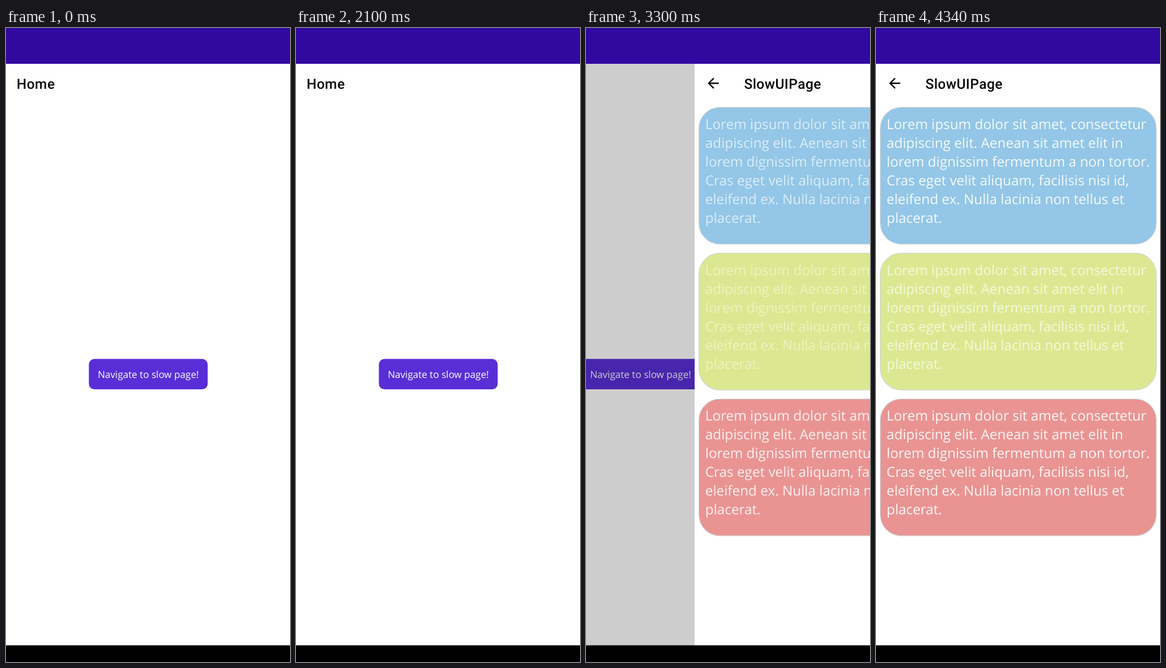
An HTML page with a canvas for the animation above (4.47 s loop, 502x1116 px).

```html
<!DOCTYPE html>
<html lang="en">
<head>
<meta charset="utf-8">
<title>Slow page navigation</title>
<style>
  html, body { margin: 0; width: 100%; height: 100%; overflow: hidden; background: #fff; }
  canvas { display: block; }
</style>
</head>
<body>
<canvas id="stage" width="502" height="1116"></canvas>
<script>
const ctx = document.getElementById('stage').getContext('2d');
const W = 502, H = 1116, TOP = 63, BOTTOM = 1086.6;
const DP = 1.2214;
const LOOP = 4470, STEP = 100;
const SLIDE_START = 3155.7, SLIDE_TIME = 359, SHARPEN = 4200;

const LINES = [
  'Lorem ipsum dolor sit amet, consectetur',
  'adipiscing elit. Aenean sit amet elit in',
  'lorem dignissim fermentum a non tortor.',
  'Cras eget velit aliquam, facilisis nisi id,',
  'eleifend ex. Nulla lacinia non tellus et',
  'placerat.'
];
// Text opacity: while sliding, at rest, after sharpening
const CARDS = [
  { color: '#93c6e7', ink: [0.68, 0.8, 0.9] },
  { color: '#dce891', ink: [0.45, 0.52, 0.68] },
  { color: '#e99493', ink: [0.85, 0.88, 0.9] }
];
const BACK_ARROW = new Path2D('M20,11H7.83l5.59,-5.59L12,4l-8,8 8,8 1.41,-1.41L7.83,13H20z');

// Standard material curve: cubic-bezier(0.4, 0, 0.2, 1)
function ease(x) {
  if (x <= 0) return 0;
  if (x >= 1) return 1;
  const curve = (u, a, b) => 3 * (1 - u) ** 2 * u * a + 3 * (1 - u) * u * u * b + u ** 3;
  let low = 0, high = 1;
  for (let i = 0; i < 30; i++) {
    const mid = (low + high) / 2;
    if (curve(mid, 0.4, 0.2) < x) low = mid; else high = mid;
  }
  return curve(low, 0, 1);
}

function rect(color, x, y, w, h) {
  ctx.fillStyle = color;
  ctx.fillRect(x, y, w, h);
}

function roundRect(color, x, y, w, h, r) {
  ctx.beginPath();
  ctx.roundRect(x, y, w, h, r);
  ctx.fillStyle = color;
  ctx.fill();
}

function text(str, x, y, font, color, { align = 'left', spacing = '0px' } = {}) {
  ctx.font = font;
  ctx.textAlign = align;
  ctx.letterSpacing = spacing;
  ctx.fillStyle = color;
  ctx.fillText(str, x, y);
}

function title(str, x) {
  text(str, x, 107, '500 24.6px Roboto, sans-serif', '#080808', { spacing: '0.4px' });
}

function drawHome() {
  rect('#fff', 0, TOP, W * 2, H - TOP);
  title('Home', 18.8);
  roundRect('#592ed7', 146.5, 582.6, 210, 53.4, 9.8);
  text('Navigate to slow page!', 251.5, 616, '17.1px "Open Sans", sans-serif', '#fff', { align: 'center' });
}

function drawCard(card, index, phase) {
  const y = 139.6 + index * 256.7;
  roundRect(card.color, 7.6, y, 487.8, 240.8, 37);
  ctx.strokeStyle = '#cfd3d4';
  ctx.lineWidth = 1.2;
  ctx.stroke();
  const ink = `rgba(255,255,255,${card.ink[phase]})`;
  LINES.forEach((line, i) =>
    text(line, 18.8, y + 38.3 + i * 33, '24.3px "Open Sans", sans-serif', ink));
}

function drawSlowPage(phase) {
  rect('#fff', 0, TOP, W, H - TOP);
  ctx.save();
  ctx.translate(18.3, 82.6);
  ctx.scale(DP, DP);
  ctx.fillStyle = '#080808';
  ctx.fill(BACK_ARROW);
  ctx.restore();
  title('SlowUIPage', 87.4);
  CARDS.forEach((card, i) => drawCard(card, i, phase));
}

function shifted(x, draw) {
  ctx.save();
  ctx.translate(x, 0);
  draw();
  ctx.restore();
}

function render(t) {
  const p = ease((t - SLIDE_START) / SLIDE_TIME);
  const phase = t >= SHARPEN ? 2 : p === 1 ? 1 : 0;
  shifted(-p * W / 2, drawHome);
  if (p > 0) {
    rect(`rgba(0,0,0,${0.32 * p})`, 0, TOP, W, H - TOP);
    shifted((1 - p) * W, () => drawSlowPage(phase));
  }
  rect('#3109a1', 0, 0, W, TOP);
  rect('#000', 0, BOTTOM, W, H - BOTTOM);
}

// The picture advances ten times per second
function tick() {
  const t = performance.now() % LOOP;
  render(Math.floor(t / STEP) * STEP);
  requestAnimationFrame(tick);
}

ctx.textRendering = 'geometricPrecision';
tick();
</script>
</body>
</html>
```
